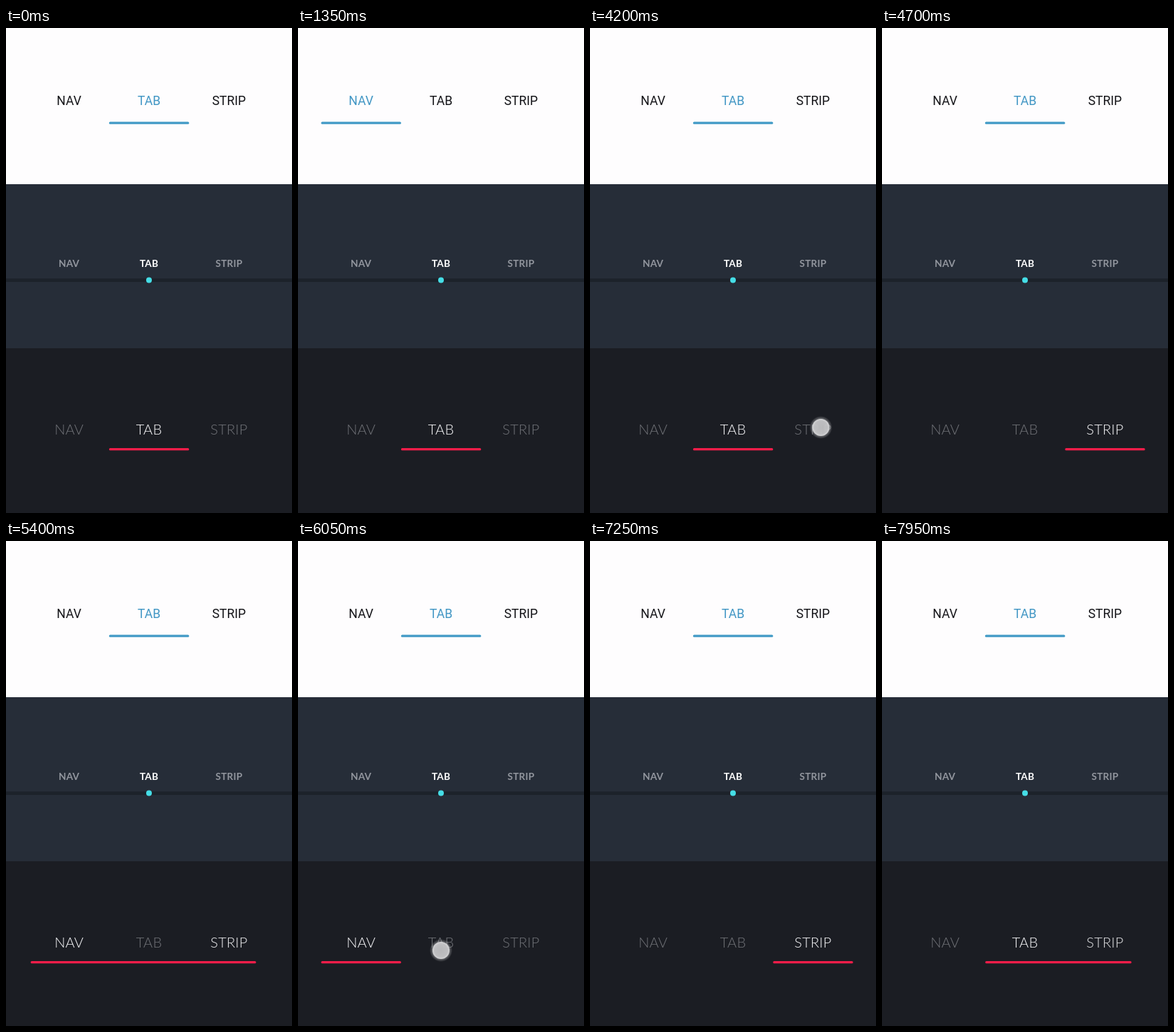
Animation of 402x680 px, one loop 8 s. Source, as an HTML page:

```html
<!DOCTYPE html>
<html lang="en">
<head>
<meta charset="utf-8">
<title>Tab strips</title>
<style>
  html, body { margin: 0; width: 100%; height: 100%; overflow: hidden; background: #1b1d23; }
  svg { display: block; width: 402px; height: 680px; }
  text { text-anchor: middle; }
  .top text { font: 400 17.5px Roboto, sans-serif; }
  .mid text { font: 700 13.6px Lato, sans-serif; letter-spacing: .2px; }
  .low text { font: 300 20px Lato, sans-serif; letter-spacing: .2px; }
</style>
</head>
<body>
<svg viewBox="0 0 402 680">
  <defs>
    <radialGradient id="glow">
      <stop offset=".7" stop-color="#fff" stop-opacity=".4"/>
      <stop offset="1" stop-color="#fff" stop-opacity="0"/>
    </radialGradient>
    <radialGradient id="disc">
      <stop offset="0" stop-color="#bdbdbf"/>
      <stop offset=".75" stop-color="#c4c4c6"/>
      <stop offset="1" stop-color="#dededf"/>
    </radialGradient>
  </defs>
  <rect width="402" height="219" fill="#fefdfe"/>
  <rect y="219" width="402" height="230" fill="#262d38"/>
  <rect y="449" width="402" height="231" fill="#1b1d23"/>
  <rect y="351.3" width="402" height="4.7" fill="#1c222a"/>
  <circle cx="201" cy="353.4" r="4" fill="#45dde6"/>
  <g class="top"></g>
  <g class="mid"></g>
  <g class="low"></g>
  <g id="lightTouch" opacity="0">
    <circle r="12.3" fill="#fff" fill-opacity=".55" stroke="#c6d5d9" stroke-opacity=".85" stroke-width="2"/>
  </g>
  <g id="darkTouch" opacity="0">
    <circle r="16" fill="url(#glow)"/>
    <circle r="12" fill="url(#disc)" fill-opacity=".92"/>
  </g>
</svg>
<script>
const NS = 'http://www.w3.org/2000/svg';
const LOOP = 8000, SLIDE = 375, FADE = 170, LEAD = 10;
const LEFT = 32.5, STEP = 112.4;
const LABELS = ['NAV', 'TAB', 'STRIP'];

// [touch down, slide start, tab, touch x, touch y]
const topTaps = [
  [800, 962, 0, 85, 94],
  [1700, 1910, 2, 313, 104],
  [2650, 2782, 1, 197, 103.5]
];
const lowTaps = [
  [4200, 4315, 2, 324.5, 560],
  [5000, 5174, 0, 86, 582],
  [5900, 6062, 1, 201, 574],
  [6700, 6860, 2, 318, 567],
  [7500, 7688, 1, 203, 567]
];

function add(parent, name, attrs) {
  const el = document.createElementNS(NS, name);
  for (const key in attrs) el.setAttribute(key, attrs[key]);
  return parent.appendChild(el);
}

function addLabels(group, y, fill) {
  return LABELS.map((label, i) => {
    const el = add(group, 'text', { x: 88.6 + STEP * i, y, fill });
    el.textContent = label;
    return el;
  });
}

function makeStrip(selector, textY, barY, barColor, idle, active, taps, touch) {
  const group = document.querySelector(selector);
  return {
    labels: addLabels(group, textY, `rgb(${idle})`),
    bar: add(group, 'rect', { y: barY, height: 3.2, rx: 1.5, fill: barColor }),
    idle, active, taps, touch: document.getElementById(touch)
  };
}

const strips = [
  makeStrip('.top', 108.2, 131.5, '#419ac6', [20, 20, 24], [65, 150, 196], topTaps, 'lightTouch'),
  makeStrip('.low', 569.8, 589.1, '#f01d49', [112, 114, 119], [250, 250, 252], lowTaps, 'darkTouch')
];

const mid = addLabels(document.querySelector('.mid'), 335.2, '#92969e');
mid[1].setAttribute('fill', '#fff');

const clamp = v => Math.max(0, Math.min(1, v));
const mix = (a, b, k) => a + (b - a) * k;
const fast = p => 1 - (1 - p) ** 5;
const slow = p => p ** 5;

function drawStrip(strip, t) {
  let from = 1, to = 1, p = 1, alpha = 0;
  for (const [down, start, tab, x, y] of strip.taps) {
    if (t >= start) {
      from = to;
      to = tab;
      p = clamp((t - start) / SLIDE);
    }
    if (t >= down - LEAD && t < start + FADE) {
      alpha = 1 - clamp((t - start) / FADE);
      strip.touch.setAttribute('transform', `translate(${x} ${y})`);
    }
  }
  strip.touch.setAttribute('opacity', alpha);

  // The edge facing the new tab leads, the other one catches up late.
  const head = mix(from, to, fast(p)), tail = mix(from, to, slow(p));
  strip.bar.setAttribute('x', LEFT + STEP * Math.min(head, tail));
  strip.bar.setAttribute('width', STEP * (Math.abs(head - tail) + 1));

  strip.labels.forEach((el, i) => {
    const k = i === to ? (from === to ? 1 : fast(p)) : i === from ? 1 - slow(p) : 0;
    const rgb = strip.idle.map((c, n) => Math.round(mix(c, strip.active[n], k)));
    el.setAttribute('fill', `rgb(${rgb})`);
  });
}

const begin = performance.now();
function frame() {
  const t = (performance.now() - begin) % LOOP;
  strips.forEach(strip => drawStrip(strip, t));
  requestAnimationFrame(frame);
}
frame();
</script>
</body>
</html>
```
